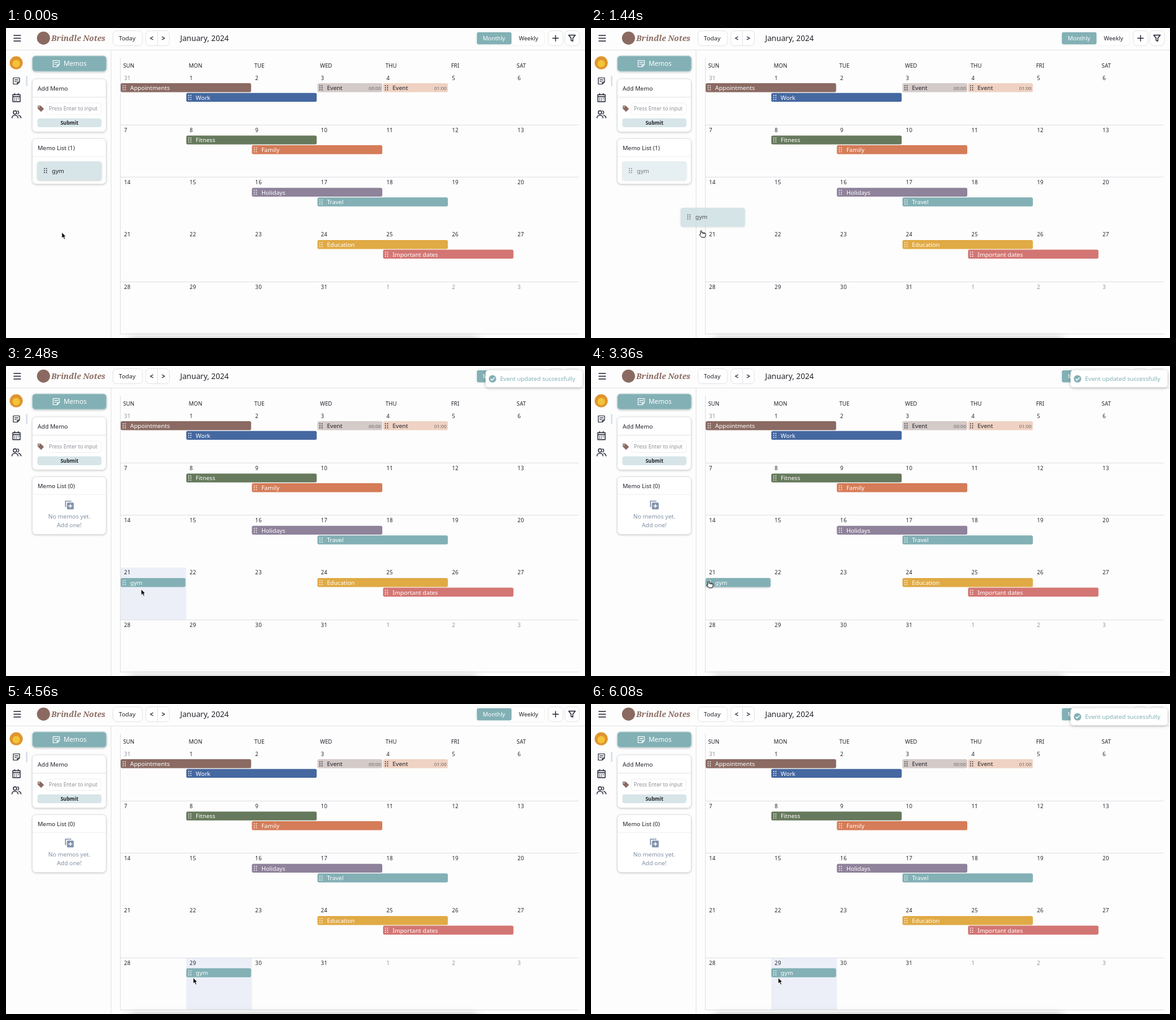
These frames come from a looping animation (934 px wide and 500 px high, 6160 ms). An HTML page:

```html
<!DOCTYPE html>
<html lang="en">
<head>
<meta charset="utf-8">
<title>Calendar</title>
<style>
html, body { margin: 0; width: 100%; height: 100%; overflow: hidden; background: #fdfdfd; }
svg { display: block; font-family: "Noto Sans", sans-serif; }
.soft { filter: drop-shadow(0 1px 1.5px #0003); }
.line { fill: none; stroke: #272a3a; stroke-width: 1.4; stroke-linecap: round; stroke-linejoin: round; }
.logo { font: italic bold 12.6px "Noto Serif", serif; }
.date { letter-spacing: 0.4px; }
.strong { font-weight: 500; }
</style>
</head>
<body>
<svg id="stage" width="934" height="500" viewBox="0 0 934 500"></svg>
<script>
const LOOP = 6160, STEP = 80;
const LEFT = 185, TOP = 72.2, COL = 105.8, ROW = 84.3;
const TEAL = '#82b0b5', INK = '#22232a', PALE = '#d7e5e8', EDGE = '#e3e4e6';

const rect = (x, y, w, h, r, fill, more = '') =>
  `<rect x="${x}" y="${y}" width="${w}" height="${h}" rx="${r}" fill="${fill}" ${more}/>`;
const text = (x, y, s, fill = INK, size = 9.6, more = '') =>
  `<text x="${x}" y="${y}" fill="${fill}" font-size="${size}" ${more}>${s}</text>`;
const path = (d, more = 'class="line"') => `<path d="${d}" ${more}/>`;
const rule = (d, color = EDGE) => path(d, `fill="none" stroke="${color}"`);
const circle = (x, y, r, fill) => `<circle cx="${x}" cy="${y}" r="${r}" fill="${fill}"/>`;
const group = (id, body, more = '') => `<g id="${id}" ${more}>${body}</g>`;
const outlined = `stroke="${EDGE}"`, strong = 'class="strong"';

function grip(x, y, fill) {
  let s = '';
  for (let i = 0; i < 6; i++) s += circle(x + i % 2 * 3.4, y + (i >> 1) * 3.3, 0.85, fill);
  return s;
}

function bar(col, row, line, days, label, fill, ink = '#fff', time = '') {
  const x = LEFT + col * COL, y = 89.1 + row * ROW + line * 15.6, w = days * COL - 1.2;
  return rect(x, y, w, 14.4, 2.5, fill) + grip(x + 4, y + 4, ink) +
    text(x + 15.3, y + 10.9, label, ink) +
    (time && text(x + w - 2, y + 10.6, time, '#6d6668', 7.8, 'text-anchor="end"'));
}

function header() {
  return rect(0, 0, 934, 35.5, 0, '#fdfdfd') + rule('M0 35.5H934') +
    path('M12.7 12H23.5M12.7 16.5H23.5M12.7 21H23.5') +
    circle(60.5, 16.3, 10.6, '#8a6a60') +
    text(73, 21, 'Brindle Notes', '#8a6a60', 12.6, 'class="logo"') +
    rect(172.5, 4.5, 47.5, 24, 6, '#fff', outlined) + text(182, 20.2, 'Today', INK, 9.7, strong) +
    rect(225.5, 4.5, 38, 24, 6, '#fff', outlined) + rule('M244.5 4.5V28.5') +
    path('M237 14.2L232.8 16.5L237 18.8M251.8 14.2L256 16.5L251.8 18.8', 'class="line" style="stroke-width:1.1"') +
    text(281, 21, 'January, 2024', INK, 12.4, strong) +
    rect(757.5, 4.5, 111, 24, 5, '#fff', 'stroke="#f1f2f3"') +
    rect(759.5, 6.8, 56, 19.6, 3, TEAL) +
    text(769, 20, 'Monthly', '#fff', 9.4) + text(827.3, 20, 'Weekly', INK, 9.4, strong) +
    rect(874.5, 4.5, 24, 24, 6, '#fff', outlined) + path('M882 16.5H891M886.5 12V21') +
    rect(901.5, 4.5, 23.5, 24, 6, '#fff', outlined) +
    path('M907.7 11.5H918.3L914.4 16.3V21.2L911.5 20V16.3Z');
}

const note = (x, y, color) =>
  path(`M${x - 5} ${y - 5}H${x + 5}V${y + 1.5}L${x + 1.5} ${y + 5}H${x - 5}Z` +
    `M${x + 5} ${y + 1.5}H${x + 1.5}V${y + 5}M${x - 2.5} ${y - 1.8}H${x + 2.5}M${x - 2.5} ${y + 1}H${x}`,
    `class="line" style="stroke:${color};stroke-width:1.2"`);

function sidebar() {
  return rule('M169.5 36V500') +
    circle(16.5, 56.2, 10.6, '#df9430') + circle(16.5, 57.5, 6, '#f3c437') +
    note(16.8, 85.5, '#272a3a') + rect(32.3, 77, 2.2, 17, 1, '#cfdde7') +
    path('M11 107.5H22.8V118.7H11ZM11 110.7H22.8M14 105.8V108M19.8 105.8V108') +
    path('M13.7 114H14M16.8 114H17.1M19.9 114H20.2M13.7 116.4H14M16.8 116.4H17.1') +
    path('M9.7 145C9.7 139.5 19.3 139.5 19.3 145M20.6 140.8Q24 141.8 24.2 145M18.8 133.6A2.7 2.7 0 0 1 18.8 138.7') +
    '<circle cx="14.5" cy="136.2" r="2.7" class="line"/>' +
    rect(42.5, 45, 119.5, 25, 5, TEAL, 'class="soft" stroke="#bcd5d8"') +
    note(81, 57.5, '#fff') + text(93, 61.3, 'Memos', '#fff', 10.6) +
    rect(42.5, 82, 119, 85.5, 6, '#fff', `class="soft" ${outlined}`) +
    text(51, 100.6, 'Add Memo', INK, 9.5, strong) + rule('M43 111.5H161') +
    path('M51.2 125.2H56L61.3 130.5L56.6 135.2L51.2 130Z', 'fill="#8a6a62"') + circle(53.3, 127.3, 0.9, '#fff') +
    rect(64.5, 121, 89, 18.5, 4, '#fff', 'stroke="#f0f0f1"') +
    text(69, 133.4, 'Press Enter to input', '#8d9096', 8.5) +
    rect(50.5, 145.8, 103.5, 14.3, 4, PALE) +
    text(102.3, 156, 'Submit', INK, 8.1, 'font-weight="bold" text-anchor="middle"') +
    rect(42.5, 178.5, 119, 73, 6, '#fff', `id="list" class="soft" ${outlined}`) +
    text(51, 196.8, 'Memo List (1)', INK, 9.5, `id="count" ${strong}`) + rule('M43 207.5H161', '#f0f0f1');
}

const memo = (id, fill) => group(id,
  rect(50.5, 215.2, 103.5, 30, 4, fill, 'class="soft"') + grip(62, 226.6, INK) + text(74, 233.5, 'gym'));

function calendar() {
  let s = rule('M184.5 48V493.5H924M184.5 156.5H924M184.5 240.5H924M184.5 409.5H924', '#dfe1e4');
  ['SUN', 'MON', 'TUE', 'WED', 'THU', 'FRI', 'SAT'].forEach((d, i) => s += text(LEFT + 4 + i * COL, 63.5, d, INK, 8.9));
  for (let i = 0; i < 35; i++) {
    const day = (i + 30) % 31 + 1, other = i < 1 || i > 31;
    s += text(LEFT + 5.5 + i % 7 * COL, 83.5 + (i / 7 | 0) * ROW, day, other ? '#8f9196' : INK, 8.6, 'class="date"');
  }
  return s +
    bar(0, 0, 0, 2, 'Appointments', '#8a6a62') + bar(1, 0, 1, 2, 'Work', '#4568a1') +
    bar(3, 0, 0, 1, 'Event', '#d4cac8', INK, '00:00') + bar(4, 0, 0, 1, 'Event', '#efd2c3', INK, '01:00') +
    bar(1, 1, 0, 2, 'Fitness', '#66795c') + bar(2, 1, 1, 2, 'Family', '#d57c58') +
    bar(2, 2, 0, 2, 'Holidays', '#8f829b') + bar(3, 2, 1, 2, 'Travel', TEAL) +
    bar(3, 3, 0, 2, 'Education', '#e0aa45') + bar(4, 3, 1, 2, 'Important dates', '#d37673');
}

const emptyList = '<g transform="translate(102 224)">' +
  path('M-6 3.5V-6H3.5', 'fill="none" stroke="#8292ac" stroke-width="1.6"') +
  rect(-3.7, -3.7, 11, 11, 1.5, '#8292ac') +
  path('M1.8 -1.2V4.8M-1.2 1.8H4.8', 'stroke="#fff" stroke-width="1.4"') + '</g>' +
  text(102, 245.8, 'No memos yet.', '#8292a5', 9.6, 'text-anchor="middle"') +
  text(102, 260.2, 'Add one!', '#8292a5', 9.6, 'text-anchor="middle"');

const toastBody = rect(773.5, 6.5, 156.5, 28, 5, '#fff', 'style="filter:drop-shadow(0 1px 2.5px #0004)"') +
  circle(784.8, 20.8, 6, TEAL) + path('M782 21L784 23L787.8 19', 'class="line" style="stroke:#fff"') +
  text(797, 24.3, 'Event updated successfully', TEAL);

const stage = document.getElementById('stage');
stage.innerHTML = rect(0, 0, 934, 500, 0, '#fdfdfd') +
  rect(0, 0, COL, ROW, 0, '#eceff8', 'id="cell"') +
  sidebar() + memo('memo', PALE) + group('empty', emptyList) +
  calendar() + group('event', bar(0, 3, 0, 1, 'gym', TEAL)) +
  header() + memo('ghost', '#cbdde1') + group('copy', bar(0, 3, 0, 1, 'gym', TEAL), 'class="soft"') +
  group('toast', toastBody) +
  rect(197, 503, 566, 20, 8, '#ccc', 'style="filter:drop-shadow(0 0 7px #0006)"') +
  group('arrow', path('M0 0V9.6L2.2 7.6L3.8 11.2L5.5 10.4L4 7H6.8Z', 'fill="#000" stroke="#fff" stroke-width=".8"')) +
  group('hand', path('M-3.4 1V-4.6Q-2.4 -6 -1.4 -4.6V-1.6Q2 -2.6 4.8 -.6V2.6L3.6 5.8H-1.6L-5 1.6Q-4.6 0 -3.4 1ZM.6 -1.6V.4M2.6 -1.4V.4',
    'fill="#fff" stroke="#111" stroke-linejoin="round"'));

const $ = id => document.getElementById(id);
const show = (id, on) => $(id).style.display = on ? '' : 'none';
const move = (id, x, y) => $(id).setAttribute('transform', `translate(${x} ${y})`);
const between = (t, a, b) => t >= a && t < b;
const ease = (t, a, b) => {
  const u = Math.min(1, Math.max(0, (t - a) / (b - a)));
  return u * u * (3 - 2 * u);
};

// Pointer moves: start, end, then the point reached.
const moves = [
  [240, 800, 60.5, 237], [1120, 1590, 218, 362], [2560, 3040, 192, 352],
  [3400, 4020, 296, 441], [4400, 4500, 302, 443.5]
];
function pointer(t) {
  let x = 90, y = 331.5;
  for (const [a, b, px, py] of moves) {
    const k = ease(t, a, b);
    x += (px - x) * k;
    y += (py - y) * k;
  }
  return [x, y];
}

function draw(t) {
  const [x, y] = pointer(t), [gx, gy] = pointer(t - 54);
  const drag1 = between(t, 1120, 1840), drag2 = between(t, 3400, 4400);
  const saved = t >= 2160, moved = t >= 4400;

  const col = Math.floor((x - LEFT) / COL), row = Math.floor((y - TOP) / ROW);
  const hover = t > 1120 && !between(t, 2850, 3401) && col >= 0;
  show('cell', hover);
  move('cell', LEFT + col * COL, TOP + row * ROW);
  $('cell').setAttribute('fill', drag2 ? '#f3f5fa' : '#eceff8');

  show('memo', !saved);
  show('empty', saved);
  $('memo').style.opacity = t > 1120 ? 0.6 : 1;
  $('memo').firstChild.setAttribute('fill', hover ? '#dfe4f1' : PALE);
  $('list').setAttribute('height', saved ? 93 : 73);
  $('count').textContent = `Memo List (${saved ? 0 : 1})`;

  show('ghost', drag1);
  $('ghost').style.opacity = 0.78;
  move('ghost', gx - 60.5, gy - 237);

  show('event', saved);
  move('event', moved ? COL : 0, moved ? ROW : 0);
  $('event').style.opacity = drag2 ? 0.55 : 1;
  $('event').setAttribute('class', between(t, 3040, 3400) ? 'soft' : '');
  show('copy', drag2);
  move('copy', gx - 192, gy - 353);

  const drop = ease(t, 2160, 2480) - ease(t, 4160, 4400) + ease(t, 4700, 4950);
  show('toast', drop > 0);
  move('toast', 0, -45 * (1 - drop));

  const hand = between(t, 720, 1840) || between(t, 2960, 4400);
  show('hand', hand);
  show('arrow', !hand);
  move('hand', x, y);
  move('arrow', x, y - 2);
}

const start = performance.now();
function tick() {
  const t = (performance.now() - start) % LOOP;
  draw(Math.floor(t / STEP) * STEP);
  requestAnimationFrame(tick);
}
tick();
</script>
</body>
</html>
```
